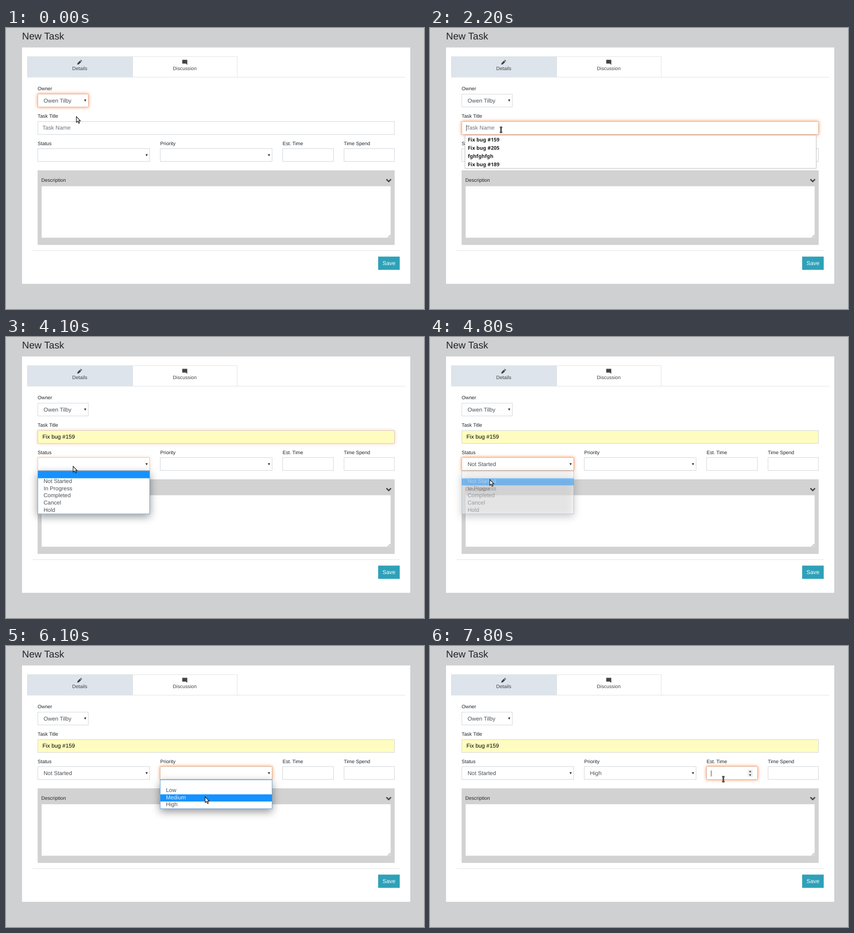
An HTML page with a canvas for the animation above (8 s loop, 912x614 px).

```html
<!DOCTYPE html>
<html lang="en">
<head>
<meta charset="utf-8">
<title>New Task</title>
<style>
  html, body { margin: 0; width: 100%; height: 100%; overflow: hidden; background: #cfd0d1; }
  canvas { display: block; }
</style>
</head>
<body>
<canvas id="stage" width="912" height="614"></canvas>
<script>
const c = document.getElementById('stage').getContext('2d');
const LOOP = 8000, STEP = 100, ROW = 15.6;
const SANS = '"Liberation Sans", Arial, sans-serif';
const DARK = '#212529', GREY = '#495057', LINE = '#ced4da';

const fields = {
  owner: [69, 144, 111, 29],
  title: [69, 204, 779, 29],
  status: [69, 263.5, 245, 29],
  priority: [336, 263.5, 245, 29],
  est: [603, 263.5, 112, 29],
  spend: [737, 263.5, 111, 29]
};
const focusLog = [[-900, 'owner'], [920, 'title'], [4100, 'status'], [5800, 'priority'], [7700, 'est']];

// time, shape, x, y
const pointerLog = [
  [0, arrow, 153, 193], [400, arrow, 154, 200], [500, beam, 155, 213], [600, beam, 155, 222.5],
  [3600, arrow, 145, 270], [3900, arrow, 87, 320], [4100, arrow, 146, 282], [4200, arrow, 137, 329],
  [4400, arrow, 131, 313], [4600, arrow, 130, 311], [5000, arrow, 250, 308], [5100, arrow, 332, 302],
  [5300, arrow, 391, 286], [5400, arrow, 418, 278], [5900, arrow, 428, 313], [6100, arrow, 434, 329],
  [6300, arrow, 434, 335], [6400, arrow, 434, 341], [6600, arrow, 426, 342], [6900, arrow, 470, 330],
  [7000, arrow, 564, 299], [7200, beam, 626, 283], [7500, beam, 617.5, 279], [7700, beam, 632, 286],
  [7800, beam, 640, 291]
];

const statusItems = ['', 'Not Started', 'In Progress', 'Completed', 'Cancel', 'Hold'];
const priorityItems = ['', 'Low', 'Medium', 'High'];
const suggestions = ['Fix bug #159', 'Fix bug #205', 'fghfghfgh', 'Fix bug #189'];

const within = (t, a, b) => t >= a && t < b;
const latest = (log, t) => log.filter(k => k[0] <= t).pop();

function box(x, y, w, h, fill) {
  c.fillStyle = fill;
  c.fillRect(x, y, w, h);
}

function frame(x, y, w, h, color) {
  c.strokeStyle = color;
  c.lineWidth = 1;
  c.strokeRect(x + .5, Math.floor(y) + .5, w - 1, h - 1);
}

function text(s, x, y, size = 10.75, color = DARK, align = 'left', font = SANS) {
  c.font = typeof size === 'number' ? `${size}px ${font}` : `${size} ${font}`;
  c.textRendering = 'geometricPrecision';
  c.textAlign = align;
  c.fillStyle = color;
  c.fillText(s, x, y);
}

function poly(points, fill, stroke, width = 1) {
  c.beginPath();
  points.forEach(([x, y]) => c.lineTo(x, y));
  c.closePath();
  if (fill) { c.fillStyle = fill; c.fill(); }
  if (stroke) { c.strokeStyle = stroke; c.lineWidth = width; c.stroke(); }
}

function path(d, color, width) {
  c.strokeStyle = color;
  c.lineWidth = width;
  c.stroke(new Path2D(d));
}

function shadow(color, blur, dy, draw) {
  c.save();
  c.shadowColor = color;
  c.shadowBlur = blur;
  c.shadowOffsetY = dy;
  draw();
  c.restore();
}

function triangle(x, y, w, h) {
  poly([[x - w / 2, y], [x + w / 2, y], [x, y + h]], '#333');
}

function arrow(x, y) {
  const shape = [[0, 0], [0, 12.6], [2.9, 10], [5, 14.8], [7.1, 13.9], [5.1, 9.3], [8.8, 9.3]];
  poly(shape.map(([a, b]) => [x + .5 + a, y + .5 + b]), '#fff', '#111', 1.2);
}

function beam(x, y) {
  const d = `M${x - 2.5} ${y - 5.5}h5M${x - 2.5} ${y + 5.5}h5M${x} ${y - 5.5}v11`;
  path(d, '#111', 3);
  path(d, '#999', .9);
}

function caret(x, y) {
  box(Math.floor(x), y, 1, 13, '#333');
}

function field(name, glow, fill = '#fff') {
  const [x, y, w, h] = fields[name], top = Math.floor(y);
  if (glow > 0) {
    shadow(`rgba(245,120,45,${.85 * glow})`, 7, 0, () => box(x, top, w, h, '#fff'));
  }
  box(x, top, w, h, fill);
  frame(x, y, w, h, LINE);
  if (glow > 0) frame(x, y, w, h, `rgba(232,170,135,${.7 * glow})`);
}

function select(name, value, glow) {
  const [x, y, w] = fields[name];
  field(name, glow);
  text(value, x + 13, Math.floor(y) + 19, 12.25, GREY);
  triangle(x + w - 7.2, y + 12.3, 5, 4.8);
}

function dropdown(name, items, active, alpha = 1) {
  const [x, , w] = fields[name], y = 292, h = items.length * ROW + 1.6;
  c.save();
  c.globalAlpha = alpha;
  shadow('rgba(0,0,0,.42)', 17, 6, () => box(x, y, w, h, '#fff'));
  items.forEach((item, i) => {
    const top = y + 1 + i * ROW;
    if (i === active) box(x, top, w, ROW, '#1492ff');
    text(item, x + 13, top + 10.6, 12.25, i === active ? '#e9f2fb' : GREY);
  });
  frame(x, y, w, Math.round(h), '#669fd6');
  c.restore();
}

function suggestBox(alpha, active) {
  c.save();
  c.globalAlpha = alpha;
  shadow('rgba(0,0,0,.12)', 5, 0, () => box(76, 234, 767, 73, '#fff'));
  frame(76, 234, 767, 73, '#c8c8c8');
  suggestions.forEach((s, i) => {
    if (i === active) box(77, 235, 765, 17, '#f1f2f2');
    text(s, 82.5, 247.5 + 18 * i, 'bold 11.1px', '#222', 'left', '"Noto Sans", sans-serif');
  });
  c.restore();
}

function tabs() {
  box(47, 62, 229, 45, '#dde4ec');
  path('M46.5 107V62.5H504.5V107M276.5 63V107M47 107.5H871', '#dee2e6', 1);
  text('Details', 161, 91.5, 10.75, '#444', 'center');
  text('Discussion', 390, 91.5, 10.75, '#444', 'center');
  poly([[155.5, 80], [156, 76.8], [161.2, 71.6], [164, 74.4], [158.8, 79.6]], '#444');
  poly([[162, 70.8], [163.3, 69.5], [166, 72.2], [164.8, 73.6]], '#444');
  poly([[384.5, 69.5], [395.5, 69.5], [395.5, 80.5], [392.5, 77.8], [384.5, 77.8]], '#444');
}

function description() {
  box(69, 311, 779, 163, '#d2d2d2');
  text('Description', 77, 336);
  poly([[829, 331.6], [831, 329.6], [835, 333.4], [839, 329.6], [841, 331.6], [835, 337.6]], '#444');
  box(77, 345, 763, 114, '#fff');
  frame(77, 345, 763, 114, '#dcdcdc');
  path('M833 458L839 452M836.5 458L839 455.5', '#777', 1);
}

function draw(t) {
  const [start, focused] = latest(focusLog, t + 20);
  const before = focusLog[focusLog.findIndex(f => f[0] === start) - 1];
  const ramp = Math.min(1, (t - start + 50) / 150);
  const glow = name => name === focused ? ramp : before && name === before[1] ? (1 - ramp) ** 2 : 0;
  const filled = t >= 2900;

  box(0, 0, 912, 614, '#cfd0d1');
  text('New Task', 35, 25, 21.3);
  box(35, 42.5, 847, 516.5, '#fff');
  tabs();

  text('Owner', 69, 136);
  text('Task Title', 69, 195.5);
  text('Status', 69, 255.5);
  text('Priority', 336.5, 255.5);
  text('Est. Time', 603.5, 255.5);
  text('Time Spend', 737, 255.5);

  description();
  box(58, 486, 801, 1, '#e0e1e2');
  box(812, 499.5, 47, 29, '#2ea1b8');
  text('Save', 835.5, 518, 12.25, '#fff', 'center');

  select('owner', 'Owen Tilby', glow('owner'));
  field('title', glow('title'), filled ? '#fefdbf' : '#fff');
  text(filled ? suggestions[0] : 'Task Name', 79.5, 222, 12.25, filled ? '#000' : '#6c757d');
  select('status', t >= 4800 ? 'Not Started' : '', glow('status'));
  select('priority', t >= 6900 ? 'High' : '', glow('priority'));
  field('est', glow('est'));
  field('spend', 0);

  if (within(t, 900, 1500) || within(t, 2100, 2900)) caret(79, 212);
  if (within(t, 2900, 3400)) caret(150, 212);
  if (t >= 7200) {
    box(693, 270, 11, 16, '#ededed');
    triangle(698.5, 275.6, 5, -3.4);
    triangle(698.5, 280.6, 5, 3.4);
  }
  if (t >= 7700) caret(613, 272);

  if (within(t, 2100, 3000)) suggestBox(t < 2200 ? .6 : filled ? .7 : 1, filled ? 0 : -1);
  if (within(t, 4100, 5000)) dropdown('status', statusItems, t < 4400 ? 0 : 1, t < 4800 ? 1 : .5);
  if (within(t, 5800, 7000)) {
    const active = t < 5900 ? 0 : t < 6100 ? 1 : t < 6300 ? 2 : 3;
    dropdown('priority', priorityItems, active, t < 6900 ? 1 : .5);
  }

  const [, shape, x, y] = latest(pointerLog, t);
  shape(x, y);
}

const begin = performance.now();
let shown = -1;
function tick() {
  const t = Math.floor((performance.now() - begin) % LOOP / STEP) * STEP;
  if (t !== shown) draw(shown = t);
  requestAnimationFrame(tick);
}
tick();
</script>
</body>
</html>
```
